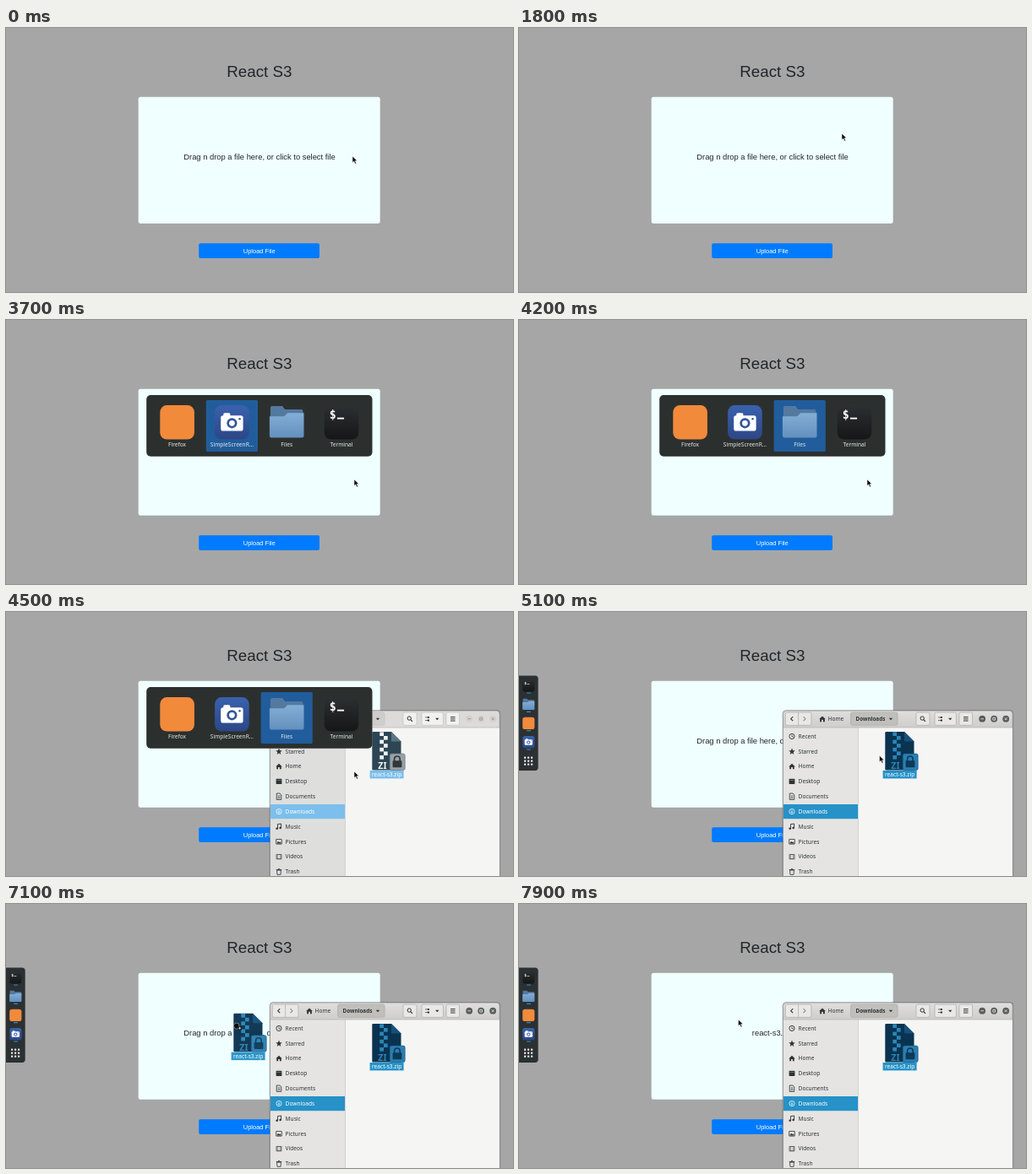
These frames come from a looping animation (600x313 px, 8 s). An HTML page:

```html
<!DOCTYPE html>
<html lang="en">
<head>
<meta charset="utf-8">
<title>React S3</title>
<style>
html, body { margin: 0; width: 100%; height: 100%; overflow: hidden; background: #a6a6a6; }
svg { display: block; width: 600px; height: 313px; }
.page { font-family: "Liberation Sans", Arial, sans-serif; text-anchor: middle; fill: #212529; }
.desk { font-family: "Noto Sans", "Open Sans", sans-serif; font-size: 6.6px; }
</style>
</head>
<body>
<svg id="stage" viewBox="0 0 600 313" xmlns="http://www.w3.org/2000/svg"></svg>
<script>
const LOOP = 8000, STEP = 100;

const rect = (x, y, w, h, fill, r = 0, more = '') =>
  `<rect x="${x}" y="${y}" width="${w}" height="${h}" rx="${r}" fill="${fill}" ${more}/>`;
const path = (d, fill, more = '') => `<path d="${d}" fill="${fill}" ${more}/>`;
const line = (d, color, width = 1) => path(d, 'none', `stroke="${color}" stroke-width="${width}"`);
const circle = (x, y, r, fill, more = '') => `<circle cx="${x}" cy="${y}" r="${r}" fill="${fill}" ${more}/>`;
const text = (x, y, str, more = '') => `<text x="${x}" y="${y}" ${more}>${str}</text>`;
const group = (id, body, more = '') => `<g id="${id}" ${more}>${body}</g>`;
const place = (x, y, scale, body) => `<g transform="translate(${x} ${y}) scale(${scale})">${body}</g>`;

// App icons, drawn in a 40 x 40 box
const appIcons = {
  terminal: rect(0, 0, 40, 40, 'url(#night)', 8) +
    text(6, 16, '$', 'font-family="DejaVu Sans Mono, monospace" font-weight="bold" font-size="13" fill="#fff"') +
    rect(15, 14.5, 8, 1.8, '#fff'),
  files: path('M1 3q0-2 2-2h12l3 4h19q2 0 2 2v30h-38z', '#54799f') +
    path('M0 13h17l4-4h19v27q0 2-2 2h-36q-2 0-2-2z', 'url(#folder)'),
  browser: rect(0, 0, 40, 40, '#f28a3c', 8),
  recorder: rect(0, 0, 40, 40, 'url(#indigo)', 8) +
    rect(7, 12, 26, 18, '#fff', 2.5) + rect(10, 9, 8, 5, '#fff', 1.5) +
    circle(20, 21, 6, '#34559a') + circle(20, 21, 3.3, '#fff') + circle(29, 16, 1.2, '#34559a')
};

function page() {
  return group('page',
    text(299.8, 58.3, 'React S3', 'font-size="18.75"') +
    rect(156.7, 81.8, 286, 150, '#f0ffff', 2.4) +
    text(300, 156.2, '', 'id="hint" font-size="9.375"') +
    rect(228.2, 255.2, 142.8, 17.8, '#007bff', 2) +
    text(299.7, 267, 'Upload File', 'font-size="7.5" fill="#fff"'), 'class="page"');
}

function dock() {
  const names = ['terminal', 'files', 'browser', 'recorder'];
  let body = path('M0 75.5h19q3.7 0 3.7 3.7v105q0 3.7-3.7 3.7H0z', '#2b3033');
  names.forEach((name, i) => {
    const y = 80.2 + i * 22.3;
    body += place(4.2, y, 0.355, appIcons[name]) + rect(9, y + 15.3, 5, 1.1, '#2f8ec9', 0.5);
  });
  for (let i = 0; i < 9; i++)
    body += rect(6 + i % 3 * 4, 171.6 + Math.floor(i / 3) * 4, 2.2, 2.2, '#e8eaea', 0.6);
  return group('dock', body);
}

function switcher() {
  const items = [['browser', 'Firefox'], ['recorder', 'SimpleScreenR…'], ['files', 'Files'], ['terminal', 'Terminal']];
  let body = rect(166.2, 89, 267.3, 72.7, '#2b302f', 5) + rect(236.8, 95, 61.2, 61, '#215d9c', 1.5, 'id="choice"');
  items.forEach(([icon, label], i) => {
    const x = 202.6 + i * 64.8;
    body += place(x - 20.3, 101, 1.015, appIcons[icon]) +
      text(x, 150.3, label, 'fill="#e6e8e8" text-anchor="middle"');
  });
  return group('switcher', body, 'class="desk"');
}

// Sidebar symbols around 0,0, about 8 px wide
const sideIcons = {
  Recent: c => circle(0, 0, 3.4, 'none', `stroke="${c}"`) + line('M0-2V0.5H2', c, 0.8),
  Starred: c => path('M0-4L1.2-1.2 4-1 1.8 1 2.5 4 0 2.3-2.5 4-1.8 1-4-1-1.2-1.2z', c),
  Home: c => path('M-4 .3L0-3.6 4 .3H3V3.6H1V1H-1V3.6H-3V.3z', c),
  Desktop: c => rect(-3.7, -3.3, 7.4, 6.6, c, 0.6) + rect(-2.9, -1.8, 5.8, 0.6, '#999'),
  Documents: c => path('M-3-4H1.2L3-2V4H-3z', 'none', `stroke="${c}" stroke-width=".9"`) + line('M-1.5-1H1.5M-1.5 .6H1.5M-1.5 2.2H1.5', c, 0.7),
  Downloads: c => circle(0, 0, 3.4, 'none', `stroke="${c}" stroke-width=".8"`) + line('M0-2V1.6M-1.6 .2L0 1.8 1.6.2', c, 0.8),
  Music: c => line('M-1.6 2.5V-3L2.8-3.6V1.6', c, 1) + circle(-2.5, 2.6, 1.4, c) + circle(1.8, 1.8, 1.4, c),
  Pictures: c => rect(-3.6, -3, 7.2, 6.2, 'none', 0.4, `stroke="${c}" stroke-width=".9"`) + path('M-3 2.6L-1-.5 .5 1.2 1.7 0 3 2.6z', c),
  Videos: c => rect(-3.6, -3.4, 7.2, 6.8, c, 0.5) + rect(-1.8, -2.5, 3.6, 5, '#ddd') + line('M-2.7-3V3M2.7-3V3', '#ddd', 0.6),
  Trash: c => path('M-2.7-1.8H2.7L2.2 3.8H-2.2z', 'none', `stroke="${c}" stroke-width=".9"`) + line('M-3.5-2.6H3.5M-1-3.6H1', c, 0.9)
};

const focused = {
  header: 'url(#bar)', edge: '#8d8c8a', side: '#e5e4e2', ink: '#2e3436', button: '#e9e8e6', press: '#c0bfbc',
  border: '#adaba8', row: '#2692c8', ring: '#5a5d5d', mark: '#f2f2f2',
  doc: '#0a3350', fold: '#14507a', teeth: '#2a86b8', lock: '#2a7fb0', shackle: '#0d3a59', tag: '#2692c8'
};
const backdrop = {
  ...focused, header: '#dcdbd9', side: '#dededd', button: '#f1f1f0', press: '#cfcecc', border: '#c4c2bf',
  row: '#7cbfec', ring: '#d2d1cf', mark: '#8b8e8f',
  doc: '#2c4655', fold: '#5b7482', teeth: '#f3f6f7', lock: '#9aa0a3', shackle: '#31383b', tag: '#7cbfec'
};

function zipFile(c) {
  let body = path('M434.5 142H456L467.5 153.5V187.5H434.5Q433.3 187.5 433.3 186.3V143.2Q433.3 142 434.5 142z', c.doc) +
    path('M456 142L467.5 153.5H457Q456 153.5 456 152.5z', c.fold);
  for (let i = 0; i < 7; i++)
    body += rect(i % 2 ? 447 : 442.3, 142.4 + i * 4.6, 4.7, 4.6, c.teeth);
  return body +
    text(440.3, 186.4, 'ZI', `font-size="10.5" font-weight="bold" fill="${c.teeth}"`) +
    rect(454.2, 168, 18, 19.6, c.lock, 2.2, `stroke="${c.fold}" stroke-width=".6"`) +
    line('M459.6 177V174.2Q459.6 171 462.9 171Q466.2 171 466.2 174.2V177', c.shackle, 1.6) +
    rect(457.6, 176.2, 10.8, 8, c.shackle, 0.8) +
    rect(430.6, 188, 40, 9.4, c.tag) +
    text(450.6, 195, 'react-s3.zip', 'fill="#fff" text-anchor="middle"');
}

function fileWindow(id, c) {
  const button = (x, w, fill = c.button) => rect(x, 119, w, 15.3, fill, 1.8, `stroke="${c.border}" stroke-width=".7"`);
  const arrow = x => path(`M${x - 2.2} 125.7h4.4l-2.2 2.6z`, c.ink);
  let body = rect(311.6, 116, 273.6, 205, '#000', 4.5, 'opacity=".22"') +
    path('M312.6 320V120.8Q312.6 117 316.4 117H580.4Q584.2 117 584.2 120.8V320z', c.header, `stroke="${c.edge}" stroke-width=".7"`) +
    rect(313, 137, 88, 180, c.side) + rect(401.3, 137, 182.6, 180, '#f5f5f4') +
    rect(401, 137, 0.6, 180, '#c6c4c1') + rect(313, 136.6, 271, 0.7, '#b3b1ae');

  body += button(315.3, 30.6) + line('M330.6 119V134.3', c.border, 0.7) +
    line('M324.2 124.2L321.7 126.7 324.2 129.2', c.ink, 1.1) + line('M336.5 124.2L339 126.7 336.5 129.2', '#8b8e8f', 1.1) +
    place(359, 126.8, 0.95, sideIcons.Home(c.ink)) + text(365.5, 129.1, 'Home', `fill="${c.ink}"`) +
    button(392.6, 55.4, c.press) + text(398.6, 129.1, 'Downloads', `font-weight="600" font-size="6.3" fill="${c.ink}"`) + arrow(440) +
    button(470, 16) + circle(477.2, 126, 2.2, 'none', `stroke="${c.ink}"`) + line('M478.8 127.6L481 129.8', c.ink, 1.2) +
    button(492, 25.4) + arrow(510.3) + line('M498.8 124.9H501M498.8 128.5H501', c.ink, 1.8) + line('M496 124.9H497.8M496 128.5H497.8M497.8 124.9H499.5M497.8 128.5H499.5', c.ink, 0.7) +
    button(521, 15.6) + line('M526 124.6H531.6M526 126.8H531.6M526 129H531.6', c.ink, 1);

  const marks = ['M-1.7 0H1.7', 'M-1.4-1.4H1.4V1.4H-1.4z', 'M-1.4-1.4L1.4 1.4M1.4-1.4L-1.4 1.4'];
  marks.forEach((d, i) => body += place(548.2 + i * 14, 126.7, 1, circle(0, 0, 3.9, c.ring) + line(d, c.mark, 0.8)));

  body += rect(313, 228, 88, 17.2, c.row);
  Object.entries(sideIcons).forEach(([name, icon], i) => {
    const y = 147.4 + i * 17.83, color = name === 'Downloads' ? '#fff' : c.ink;
    body += `<g class="${i < 2 ? 'recent' : ''}">` + place(323, y, 0.92, icon(color)) +
      text(330.6, y + 2.4, name, `fill="${color}"`) + '</g>';
  });
  return group(id, body + zipFile(c), 'class="desk"');
}

function pointers() {
  const arrow = path('M0 0V7.6L1.8 6 3.1 9 4.5 8.4 3.2 5.5H5.6z', '#0b0b0b', 'stroke="#fff" stroke-width=".5"');
  const fist = path('M.3 4.2Q0 2.6 1.6 2.6Q1.7 1 3 1.4Q4 .6 4.8 1.5Q6.6 1.2 6.7 3V5.6Q6.5 8 4.3 8H3.2Q1.4 8 .3 4.2z', '#0b0b0b', 'stroke="#fff" stroke-width=".4"');
  return group('pointer', group('arrow', arrow) +
    group('fist', fist + group('plus', rect(5.4, 5, 4.4, 4.4, '#222', 0.6) + line('M7.6 5.9V8.5M6.3 7.2H8.9', '#fff', 0.8))));
}

const gradient = (id, top, bottom) =>
  `<linearGradient id="${id}" x2="0" y2="1"><stop stop-color="${top}"/><stop offset="1" stop-color="${bottom}"/></linearGradient>`;

document.getElementById('stage').innerHTML =
  '<defs>' + gradient('night', '#2d3032', '#141617') + gradient('folder', '#84aed6', '#6390bd') +
  gradient('indigo', '#3a62ad', '#2c4687') +
  '<linearGradient id="bar" gradientUnits="userSpaceOnUse" x1="0" x2="0" y1="117" y2="137"><stop stop-color="#e0dfdd"/><stop offset="1" stop-color="#cfcdcb"/></linearGradient></defs>' +
  rect(0, 0, 600, 313, '#a6a6a6') + page() + dock() +
  fileWindow('dimWindow', backdrop) + fileWindow('liveWindow', focused) + switcher() +
  group('ghost', zipFile(focused), 'class="desk" opacity=".96"') + pointers();

// Keys are [time, x, y]
const pointerKeys = [
  [0, 410, 152], [200, 392, 222], [450, 310, 264], [700, 238, 232], [900, 211, 177], [1100, 193, 142],
  [1300, 222, 114], [1500, 290, 109], [1800, 382, 125], [1900, 382, 125], [2400, 410, 150], [2600, 418, 165],
  [2700, 415, 169], [3100, 415, 169], [3300, 412, 189], [4700, 412, 189], [5400, 436, 156], [5800, 434, 153],
  [6200, 390, 159.5], [6500, 340, 155], [7100, 269, 140], [7400, 259.5, 137], [8000, 259.5, 137]
];
const ghostKeys = [[5800, 0, 0], [6200, -35, 8.7], [6500, -88, 3], [7100, -164, -12.3], [7400, -171, -18], [8000, -171, -18]];

// Monotone cubic interpolation: smooth, without overshoot
function along(keys, t, axis) {
  const slope = i => (keys[i + 1][axis] - keys[i][axis]) / (keys[i + 1][0] - keys[i][0]);
  const tangent = i => {
    if (i === 0 || i === keys.length - 1) return 0;
    const a = slope(i - 1), b = slope(i);
    return a * b <= 0 ? 0 : 2 * a * b / (a + b);
  };
  if (t <= keys[0][0]) return keys[0][axis];
  let i = 0;
  while (i < keys.length - 2 && t >= keys[i + 1][0]) i++;
  const span = keys[i + 1][0] - keys[i][0], u = (t - keys[i][0]) / span, v = 1 - u;
  return v * v * (1 + 2 * u) * keys[i][axis] + u * u * (3 - 2 * u) * keys[i + 1][axis] +
    span * u * v * (v * tangent(i) - u * tangent(i + 1));
}

const el = id => document.getElementById(id);
const show = (id, on) => el(id).setAttribute('display', on ? 'inline' : 'none');
const move = (id, x, y) => el(id).setAttribute('transform', `translate(${x.toFixed(2)} ${y.toFixed(2)})`);

function draw(t) {
  const x = along(pointerKeys, t, 1), y = along(pointerKeys, t, 2);
  const dragging = t >= 5900 && t < 7500, inWindow = x > 312;

  show('switcher', t >= 3700 && t < 4600);
  el('choice').setAttribute('x', t < 4100 ? 236.8 : 301.6);
  show('dimWindow', t >= 4400 && t < 4600);
  show('liveWindow', t >= 4600);
  show('dock', t >= 4600);
  show('ghost', dragging);
  show('arrow', !dragging);
  show('fist', dragging);
  show('plus', !inWindow);
  move('pointer', x, y);
  move('ghost', along(ghostKeys, t, 1), along(ghostKeys, t, 2));
  for (const row of document.querySelectorAll('#liveWindow .recent'))
    row.setAttribute('opacity', dragging && inWindow ? 0.5 : 1);
  el('hint').textContent = t < 7500 ? 'Drag n drop a file here, or click to select file' : 'react-s3.zip';
}

const start = performance.now();
function tick() {
  const t = (performance.now() - start) % LOOP;
  draw(Math.floor(t / STEP) * STEP);
  requestAnimationFrame(tick);
}
tick();
</script>
</body>
</html>
```
